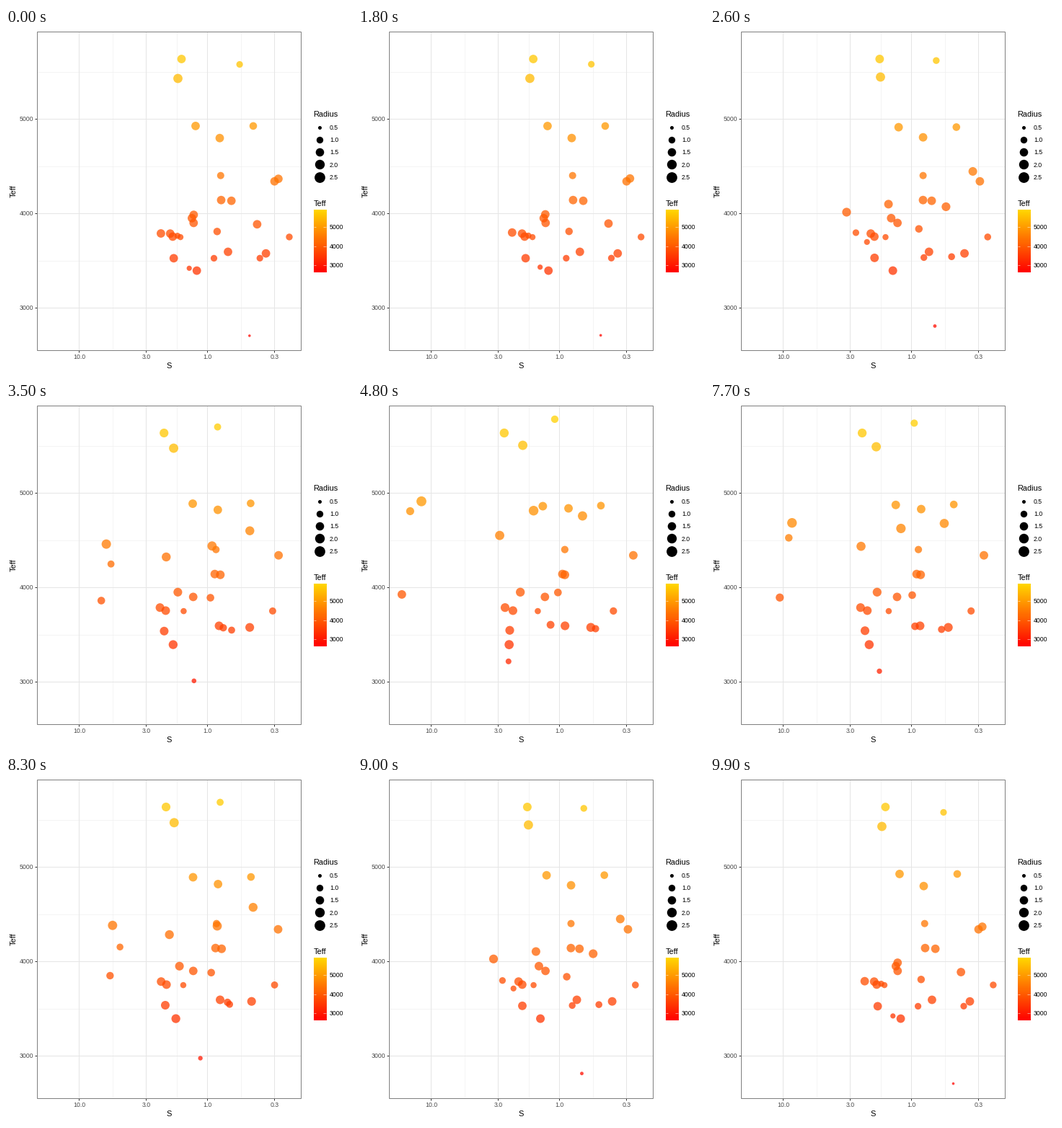
These frames come from a looping animation (480x480 px, 10000 ms). A matplotlib script:

```python
import numpy as np
import matplotlib.pyplot as plt
from matplotlib.animation import FuncAnimation
from matplotlib.patches import Rectangle

SIZE, FRAMES, INTERVAL = 480, 100, 100
LEFT, RIGHT, TOP, BOTTOM = 43.5, 409.5, 5.5, 447.5
BAR = (427, 444.3, 340, 253.6)  # left, right, bottom, top
T_MIN, T_MAX = 2610, 5870
GROWTH = 0.1  # gain in squared radius per pixel of drift

plt.rcParams["font.family"] = "Liberation Sans"


def star(x, y, drift, r=5.9):
    return x, y, drift, r


# Stars grouped by how far they climb per pixel of leftward drift
GROUPS = {
    0: [star(244, 43.5, 41), star(298.3, 205.2, 11, 5), star(373, 213.2, -9.5),
        star(299, 239.2, 15), star(313.2, 240.2, 26), star(258.4, 264.3, 33),
        star(260.8, 270.9, 1), star(393.5, 290.4, 39, 4.7), star(228.3, 285.7, 24),
        star(231.8, 289.9, 16.5), star(242.5, 290.6, -7.5, 4.2),
        star(308.5, 311, 21), star(361.1, 313.2, 38), star(265.2, 337.1, 55.5)],
    0.12: [star(238.4, 288.7, 178.6, 4.2), star(289, 319.9, -41.4, 4.6),
           star(352.7, 319.8, 85.8, 4.6), star(233.2, 319.9, 22.4)],
    0.52: [star(324.6, 51, 51.6, 4.6), star(338.3, 427.4, 130.1, 1.8)],
    0.77: [star(378.4, 209.7, 67)],
    1: [star(239, 70.5, 10, 6.4), star(254.7, 333.8, 183.4, 3.6)],
    1.16: [star(297, 153.2, 4.5), star(260.9, 259.7, 64.4), star(348.9, 272.8, 105.7),
           star(293.4, 282.8, 15.7, 5.2), star(215.4, 285.5, 128)],
    -1.3: [star(263.5, 136.4, 6.7), star(343.5, 136.4, 6.1, 5.3)],
}
X, Y, DRIFT, RADIUS, CLIMB = np.array(
    [(*s, climb) for climb, stars in GROUPS.items() for s in stars]).T


def x_of(s):
    return 279.8 - 178 * np.log10(s)


def y_of(teff):
    return 126.5 + (5000 - teff) * 0.131


def teff_of(y):
    return 5000 - (y - 126.5) / 0.131


def heat(teff, alpha=1.0):
    """Red to gold."""
    k = np.clip((teff - T_MIN) / (T_MAX - T_MIN), 0, 1)
    one = np.ones_like(k)
    return np.stack([one, 0.843 * k, 0 * k, alpha * one], -1)


def ease(t):
    return (1 - np.cos(np.pi * np.clip(t, 0, 1))) / 2


def progress(i):
    """Hold, move out, hold, move back."""
    return ease((i - 16) / 34) - ease((i - 67) / 33)


fig = plt.figure(figsize=(SIZE / 72, SIZE / 72), dpi=72, facecolor="white")
ax = fig.add_axes([0, 0, 1, 1])
ax.axis("off")


def line(x, y, color, width, z=1):
    ax.plot(x, y, color=color, lw=width, zorder=z, solid_capstyle="butt")


def label(x, y, text, size=8.8, color="#4D4D4D", ha="left"):
    ax.text(x, y + 0.36 * size, text, fontsize=size, color=color,
            ha=ha, va="baseline")


# Grid
for s in 10 / np.sqrt(10 / 3), np.sqrt(3), np.sqrt(0.3):
    line([x_of(s)] * 2, [TOP, BOTTOM], "#EBEBEB", 0.55)
for t in 3500, 4500, 5500:
    line([LEFT, RIGHT], [y_of(t)] * 2, "#EBEBEB", 0.55)
for s in 10, 3, 1, 0.3:
    x = x_of(s)
    line([x, x], [TOP, BOTTOM], "#E6E6E6", 1.07)
    line([x, x], [BOTTOM, BOTTOM + 3], "#333333", 1)
    label(x + 0.5, 456.3, f"{s:.1f}", ha="center")
for t in 3000, 4000, 5000:
    y = y_of(t)
    line([LEFT, RIGHT], [y, y], "#E6E6E6", 1.07)
    line([LEFT - 3, LEFT], [y, y], "#333333", 1)
    label(38.5, y, str(t), ha="right")
ax.add_patch(Rectangle((LEFT, TOP), RIGHT - LEFT, BOTTOM - TOP, fill=False,
                       ec="#7F7F7F", lw=1, zorder=5))

label(227, 468.2, "S", 11, "black", "center")
ax.text(13.8, 226.8, "Teff", fontsize=11, rotation=90, rotation_mode="anchor",
        ha="center", va="baseline")

# Radius legend
label(427, 119.5, "Radius", 11, "black")
for k, r in enumerate([2.5, 4.7, 5.8, 6.7, 7.4]):
    y = 138 + 17.3 * k
    ax.scatter([435.8], [y], s=4 * r * r, color="black", lw=0)
    label(449.5, y, f"{0.5 + 0.5 * k:.1f}", color="black")

# Temperature legend
label(427, 243.6, "Teff", 11, "black")
left, right, low, high = BAR
ramp = heat(np.linspace(T_MAX, T_MIN, 86))[:, None, :]
ax.imshow(ramp, extent=BAR, aspect="auto", interpolation="nearest")
for t in 3000, 4000, 5000:
    y = low - (t - T_MIN) / (T_MAX - T_MIN) * (low - high)
    line([left, left + 3.5], [y, y], "white", 0.5, 3)
    line([right - 3.5, right], [y, y], "white", 0.5, 3)
    label(449.5, y, str(t), color="black")

points = ax.scatter(X, Y, lw=0, zorder=4)
ax.set_xlim(0.5, SIZE + 0.5)
ax.set_ylim(SIZE + 0.5, 0.5)


def draw(i):
    p = progress(i)
    shift = np.abs(DRIFT) * p
    y = Y - CLIMB * shift
    points.set_offsets(np.column_stack([X - DRIFT * p, y]))
    points.set_sizes(4 * (RADIUS ** 2 + GROWTH * shift))
    points.set_facecolors(heat(teff_of(y), 0.75))
    return (points,)


anim = FuncAnimation(fig, draw, frames=FRAMES, interval=INTERVAL,
                     repeat=True, repeat_delay=0)
plt.show()
```
